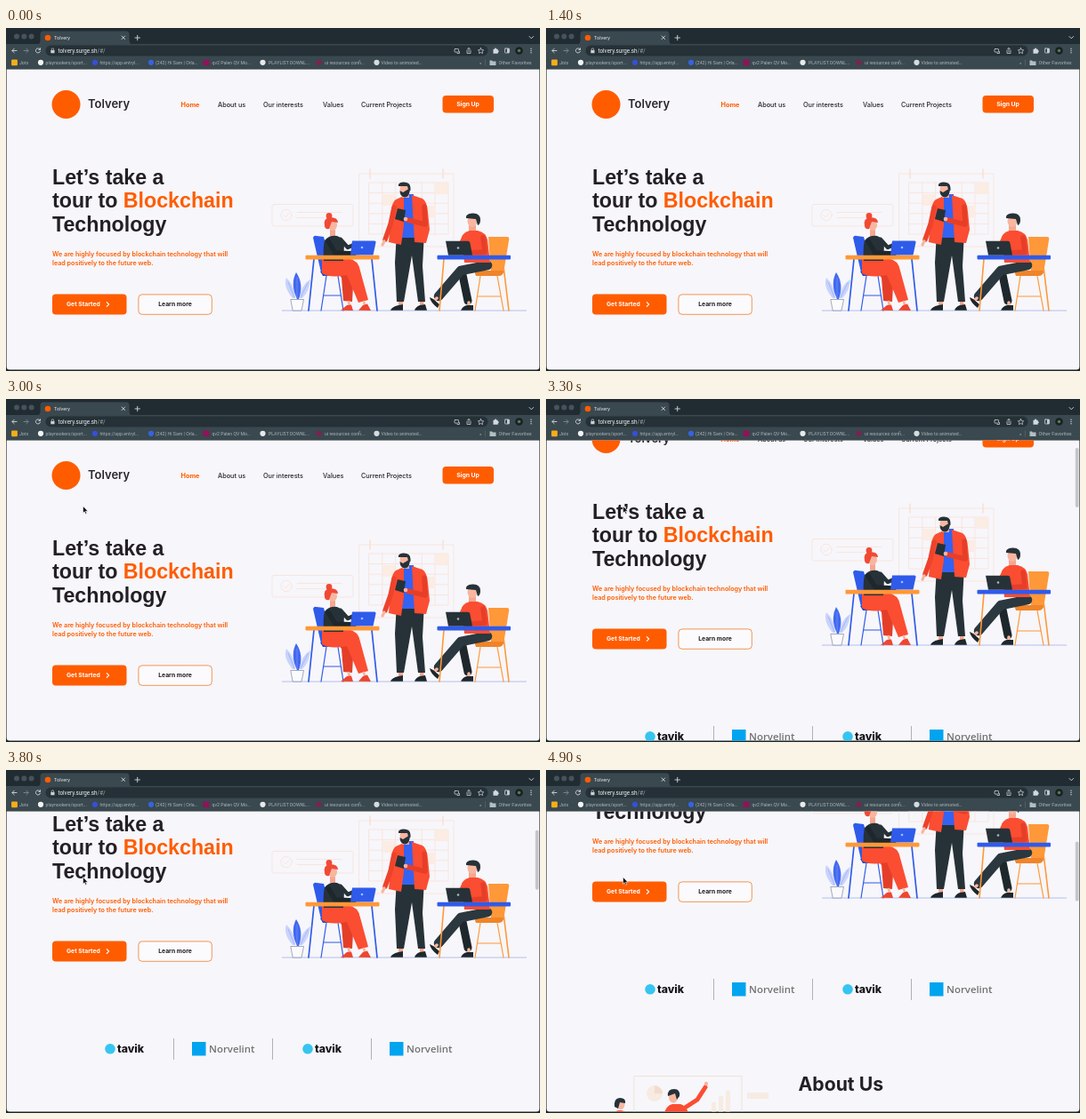
Recreate the animation shown at these times as an HTML page. Size 600 px wide and 386 px high, loop 5 s.

```html
<!DOCTYPE html>
<html lang="en">
<head>
<meta charset="utf-8">
<title>Tolvery</title>
<style>
html, body { margin: 0; width: 100%; height: 100%; overflow: hidden; background: #1b262b; }
svg { display: block; width: 100vw; height: 100vh; font-family: Inter, "Open Sans", sans-serif; }
.ui { font-family: Roboto, Inter, sans-serif; }
.nav { font-size: 7.3px; font-weight: 500; fill: #262329; }
.btn { font-size: 6.8px; font-weight: 700; }
.title { font: bold 23.2px "Liberation Sans", Arial, sans-serif; fill: #231f24; }
.lead { font-size: 7.2px; font-weight: 600; fill: #ff5c00; }
.line { fill: none; stroke-linecap: round; stroke-linejoin: round; }
</style>
</head>
<body>
<svg viewBox="0 0 600 386" preserveAspectRatio="none">
  <defs>
    <clipPath id="view"><path d="M.6 46.5H599.4V381Q599.4 384.5 596 384.5H4Q.6 384.5 .6 381Z"/></clipPath>
  </defs>
  <rect width="600" height="386" fill="#1b262b"/>

  <g clip-path="url(#view)">
    <rect y="46" width="600" height="340" fill="#f7f6fa"/>
    <g id="page">
      <!-- navigation -->
      <circle cx="67.5" cy="86" r="16" fill="#ff5c00"/>
      <text x="92" y="90" font-size="13" font-weight="600" fill="#2a272c">Tolvery</text>
      <g class="nav">
        <text x="196.5" y="88.5" style="font-weight:700;fill:#ff5c00">Home</text>
        <text x="238" y="88.5">About us</text>
        <text x="289" y="88.5">Our interests</text>
        <text x="356" y="88.5">Values</text>
        <text x="399" y="88.5">Current Projects</text>
      </g>
      <rect x="490.5" y="76" width="57.5" height="19.5" rx="4" fill="#ff5c00"/>
      <text class="btn" x="519" y="88.3" text-anchor="middle" fill="#fff">Sign Up</text>

      <!-- headline -->
      <g class="title">
        <text x="52" y="175.5">Let’s take a</text>
        <text x="52" y="202">tour to <tspan fill="#ff5c00">Blockchain</tspan></text>
        <text x="52" y="228.5">Technology</text>
      </g>
      <text class="lead" x="52" y="256.5">We are highly focused by blockchain technology that will</text>
      <text class="lead" x="52" y="266.5">lead positively to the future web.</text>
      <rect x="52" y="299.5" width="83.5" height="23" rx="4" fill="#ff5c00"/>
      <text class="btn" x="68" y="313.4" fill="#fff">Get Started</text>
      <path class="line" d="M113.2 308.6l2.4 2.4-2.4 2.4" stroke="#fff" stroke-width="1.1"/>
      <rect x="148.9" y="299.9" width="82.4" height="22.4" rx="4" fill="#fbfafc" stroke="#f08c45" stroke-width=".9"/>
      <text class="btn" x="190" y="313.4" text-anchor="middle" fill="#1f1c20">Learn more</text>

      <!-- pale wall pieces -->
      <g class="line" stroke="#f8e0d5" stroke-width=".7">
        <rect x="299" y="198.5" width="91" height="24.5" rx="2"/>
        <circle cx="315" cy="210.5" r="6.2"/>
        <path d="M312 210.5l2.2 2.3 4-4.5M327 207.5H377M327 213.5H364"/>
        <rect x="397" y="164" width="106" height="82"/>
        <path d="M409 159v10M491 159v10" stroke-width="1.4"/>
        <path id="grid"/>
      </g>
      <path d="M423 187h14v13h-14zM468 200h14v13h-14zM482 174h15v13h-15z" fill="#fbece4"/>

      <path d="M310 318H585" stroke="#a9b9ee" stroke-width=".9"/>

      <!-- plant -->
      <path d="M322 304Q311 291 315 281Q324 289 325 304ZM330 304Q332 288 342 283Q341 296 333 304Z" fill="#c9d4fb"/>
      <path d="M327 305Q319 288 326 275Q335 288 329 305Z" fill="#4169f0"/>
      <path class="line" d="M327 281V304M317 286L324 303M339 287L331 303" stroke="#8aa3f7" stroke-width=".6"/>
      <path d="M319.8 305.5H334.5L332 318H322.200Z" fill="#fbfbfd" stroke="#6b7596" stroke-width=".6"/>

      <!-- seated woman -->
      <path d="M345 236Q346 233 349 234L357 235Q363 256 365 275H354Z" fill="#2f5bea"/>
      <path d="M353 274H381Q382 279 377 279H356Z" fill="#2449c9"/>
      <path class="line" d="M360 279L354 318M373 279L379 318M357 301H376" stroke="#2f5bea" stroke-width="1.2"/>
      <path d="M362 262H384Q392 264 391 273L389 308L379 307L377 281Z" fill="#e53e28"/>
      <path d="M355 259H384Q396 261 398 273L407 306L396 309L383 278Q364 282 355 276Z" fill="#fb4d32"/>
      <path class="line" d="M385 308L386 313M402 308L404 314" stroke="#f8b6a0" stroke-width="2.6"/>
      <path d="M376 317.800L383 312L388 311.500L390 318ZM396 317.800L401 312L406 310.500L410 318Z" fill="#ef4630"/>
      <path d="M364 227h6v9h-6z" fill="#f5a78f"/>
      <path d="M358 239Q363 233 372 234Q379 236 380 244L379 262H357Q356 247 358 239Z" fill="#263238"/>
      <path class="line" d="M362 240L370 253L391 254" stroke="#1d272c" stroke-width="5.5"/>
      <path class="line" d="M376 238L384 247L393 243" stroke="#263238" stroke-width="4.5"/>
      <circle cx="396" cy="254" r="2" fill="#f8b6a0"/>
      <ellipse cx="367" cy="221.500" rx="5" ry="6.500" fill="#f8b6a0"/>
      <circle cx="363" cy="211.500" r="3.400" fill="#f04a35"/>
      <path d="M358 223Q356 214 364 213Q373 213 373 219L366 218L363 226Q359 227 358 223Z" fill="#f04a35"/>
      <path d="M389 239.500H414Q416 239.500 415.500 241.500L412.500 255.500H387Z" fill="#2f5bea"/>
      <circle cx="400" cy="247" r="1.300" fill="#a9bcfb"/>
      <path class="line" d="M346 260L340 318M411 260L417 318" stroke="#2f5bea" stroke-width="1.7"/>
      <rect x="336.500" y="255.700" width="83" height="4.800" rx="1" fill="#ff9838"/>

      <!-- standing man -->
      <path d="M439 230H470L468 268L471 308H463L456 256L447 308H439L437 264Z" fill="#263238"/>
      <path d="M441 308h5v5h-5zM465 308h4.500v5h-4.500z" fill="#f5a78f"/>
      <path d="M432 317.800Q433 314 441 312L446 311V317.800ZM459 317.800Q460 314 465 312L471 311L473 317.800Z" fill="#1d272c"/>
      <path d="M445 187H458L461 236H443Z" fill="#3462f2"/>
      <path d="M447 189L438 193Q434 196 433 204L430 241L444 244L447 222Z" fill="#fb4d32"/>
      <path d="M456 188L468 192Q473 195 474 207L476 227L472 242L459 241Z" fill="#fb4d32"/>
      <path class="line" d="M436 202L432 221L426 238" stroke="#ee422b" stroke-width="5.500"/>
      <path class="line" d="M470 201L471 221L451 216" stroke="#e73e28" stroke-width="5.500"/>
      <path class="line" d="M425 240L423 244" stroke="#f8b6a0" stroke-width="3.200"/>
      <path d="M440 203L449 205L447 218L437 215Z" fill="#263238"/>
      <circle cx="449" cy="215" r="2.300" fill="#f8b6a0"/>
      <path d="M445 185h8v6h-8z" fill="#f5a78f"/>
      <ellipse cx="448" cy="181" rx="5.400" ry="7" fill="#f8b6a0"/>
      <path d="M442.500 183L446 185L451 182L454 180Q454 190 448 190.500Q442.500 190 442.500 183Z" fill="#263238"/>
      <path d="M441 178Q440 174 446 173.500Q454.500 173 454.500 180V183L452 182L451 178Z" fill="#263238"/>

      <!-- seated man -->
      <path d="M542 235H563Q566 235 565 239L559 276H545Z" fill="#ff9838"/>
      <path d="M526 273H559Q559 279 553 279H528Z" fill="#ef842a"/>
      <path class="line" d="M533 279L527 318M552 279L559 318M530 302H556" stroke="#ff9838" stroke-width="1.200"/>
      <path class="line" d="M540 267L512 273L519 307" stroke="#1d272c" stroke-width="9"/>
      <path class="line" d="M541 267L511 273L486 302" stroke="#2b383f" stroke-width="10.500"/>
      <path class="line" d="M484 304L481 307M520 309V313" stroke="#f8b6a0" stroke-width="3.500"/>
      <path d="M476 303L480 305L487 311L485 315Q477 309 476 303ZM511 317.800Q513 313 518 312H525V317.800H511Z" fill="#1d272c"/>
      <path d="M520 221h8v9h-8z" fill="#f5a78f"/>
      <path d="M512 235Q514 230 521 228H530Q539 230 541 238L544 264H515Z" fill="#fb4d32"/>
      <path class="line" d="M536 236L538 252L517 253" stroke="#e73e28" stroke-width="5.500"/>
      <path class="line" d="M515 236L510 247" stroke="#fb4d32" stroke-width="6"/>
      <circle cx="514" cy="253" r="2.300" fill="#f8b6a0"/>
      <ellipse cx="524" cy="217" rx="5.500" ry="7" fill="#f8b6a0"/>
      <path d="M517 214Q516 209 524 208.500Q533 208 533 216Q533 221 530 222L528 215Z" fill="#263238"/>
      <path d="M494 239.700H519Q521 239.700 521.300 241.500L524 255.700H497Z" fill="#263238"/>
      <circle cx="508" cy="247.500" r="1.300" fill="#aeb8bd"/>
      <path class="line" d="M492 260L487 318M558 260L565 318" stroke="#ff9838" stroke-width="1.600"/>
      <rect x="484.500" y="255.700" width="82.500" height="4.800" rx="1" fill="#2f5bea"/>

      <!-- partner strip -->
      <path d="M188.500 409v24M299.500 409v24M410.500 409v24" stroke="#aaa8ae" stroke-width=".9"/>
      <g id="partners">
        <circle cx="117" cy="420.800" r="5.800" fill="#36c5f0"/>
        <text x="125" y="424.800" font-size="12.300" font-weight="800" fill="#17151a">tavik</text>
        <rect x="209" y="413" width="15.500" height="15.500" fill="#00a4ef"/>
        <text x="228" y="425.200" style="font:600 11.400px 'Open Sans',sans-serif" fill="#737373">Norvelint</text>
      </g>
      <use href="#partners" x="222"/>

      <!-- next section -->
      <text x="283.500" y="534.500" font-size="21.200" font-weight="700" fill="#231f24">About Us</text>
      <path class="line" d="M99 570V518.500H220V570" stroke="#eadfc9" stroke-width=".7"/>
      <g fill="#f7ebe2">
        <circle cx="122" cy="538" r="9"/>
        <path d="M186 548h5v12h-5zM194 541h5v19h-5zM202 535h5v25h-5zM226 537h24v7h-24z"/>
      </g>
      <path d="M122 538V529A9 9 0 0 1 131 538Z" fill="#f3dccd"/>
      <path class="line" d="M153 556L170 545L179 531" stroke="#fb4d32" stroke-width="5"/>
      <circle cx="180" cy="527" r="2.200" fill="#f8b6a0"/>
      <path d="M132 570Q132 552 142 550H151Q160 552 162 570Z" fill="#fb4d32"/>
      <ellipse cx="143" cy="542" rx="5" ry="6.600" fill="#f8b6a0"/>
      <path d="M137 541Q136 533 144 533Q151 533 150 541L147 545L145 538Z" fill="#263238"/>
      <ellipse cx="84" cy="550" rx="4.600" ry="6" fill="#f8b6a0"/>
      <path d="M77 553Q76 543 83 543Q90 543 89 549L83 548L81 555Z" fill="#263238"/>
      <path d="M75 562Q77 557 83 557Q89 557 91 562Z" fill="#fb4d32"/>
    </g>
    <rect id="thumb" x="594.800" width="3.700" height="67" rx="1.850" fill="#c6c5c9"/>
  </g>

  <!-- browser frame -->
  <g class="ui">
    <rect width="600" height="18.500" fill="#202c32"/>
    <rect y="18" width="600" height="28" fill="#3a484f"/>
    <path d="M35 18.500Q38.500 18 38.500 14V7Q38.500 3.500 42 3.500H135Q138.500 3.500 138.500 7V14Q138.500 18 142 18.500Z" fill="#3a484f"/>
    <g fill="#46535a"><circle cx="12" cy="9.500" r="3"/><circle cx="20.300" cy="9.500" r="3"/><circle cx="28.600" cy="9.500" r="3"/></g>
    <circle cx="47" cy="11" r="3.300" fill="#ff5c00"/>
    <text x="54" y="13" font-size="5.600" fill="#e4e9eb">Tolvery</text>
    <g class="line" stroke="#d3dadd" stroke-width=".9">
      <path d="M130 9l3.600 3.600M133.600 9l-3.600 3.600M145 11h5.400M147.700 8.300v5.400M588 9.500l2.300 2.300 2.300-2.300"/>
      <path d="M12 25.500H7M9.200 23.200L6.900 25.500l2.300 2.300M38.200 24a2.600 2.600 0 1 0 .3 2.200M38.500 22.700v1.700h-1.700"/>
      <path d="M20 25.500h5M22.800 23.200l2.300 2.300-2.300 2.300" stroke="#7d898f"/>
    </g>
    <rect x="44.500" y="19.600" width="497" height="11.800" rx="5.900" fill="#253137"/>
    <path d="M50.300 25h4.200v3.300h-4.200z" fill="#c9d1d4"/>
    <path class="line" d="M51.200 25v-1a1.200 1.200 0 0 1 2.400 0v1" stroke="#c9d1d4" stroke-width=".7"/>
    <text x="58.500" y="27.600" font-size="6.300" fill="#eef1f2">tolvery.surge.sh<tspan fill="#a2adb2">/#/</tspan></text>
    <g class="line" stroke="#c3ccd0" stroke-width=".8">
      <rect x="504" y="23.500" width="4.500" height="3.600" rx=".6"/><path d="M507 28.500h2.500v-2"/>
      <path d="M518 25v3.500h4V25M520 27v-4.500M518.700 23.700l1.300-1.300 1.300 1.300"/>
      <path d="M533.500 22.500l1 2.100 2.200.3-1.600 1.500.4 2.200-2-1.100-2 1.100.4-2.200-1.600-1.500 2.200-.3z"/>
      <rect x="560.500" y="23" width="5" height="5" rx=".7"/>
    </g>
    <path d="M563 23h2.500v5H563z" fill="#c3ccd0"/>
    <path d="M547.500 23.700h1.500a1.100 1.100 0 0 1 2.200 0h1.500v1.500a1.100 1.100 0 0 1 0 2.200v1.300h-5.200z" fill="#d3dadd"/>
    <circle cx="576.500" cy="25.500" r="4.300" fill="#182126"/><circle cx="576.500" cy="25.500" r="1.800" fill="#5e7a4a"/>
    <g fill="#d3dadd"><circle cx="590" cy="23.200" r=".7"/><circle cx="590" cy="25.500" r=".7"/><circle cx="590" cy="27.800" r=".7"/></g>
    <g id="marks" font-size="5.200" fill="#a9b5ba"></g>
    <path d="M538.500 35.500v7" stroke="#5b686e" stroke-width=".7"/>
    <path d="M543.500 36.500h2.500l.8 1h3.700v4.500h-7z" fill="#b3bec3"/>
  </g>
  <path id="cursor" d="M86.500 120.500V128.300L88.300 126.700L89.500 129.400L90.800 128.800L89.600 126.200H92Z" fill="#0c0c0d" stroke="#fff" stroke-width=".6"/>
</svg>
<script>
const $ = id => document.getElementById(id);
const SVG = "http://www.w3.org/2000/svg";
const LOOP = 5000, STEP = 100;

function add(parent, tag, attrs, label) {
  const el = document.createElementNS(SVG, tag);
  for (const key in attrs) el.setAttribute(key, attrs[key]);
  if (label) el.textContent = label;
  parent.append(el);
}

// calendar cells
let grid = "M408 174H497V232H408Z";
for (let i = 1; i < 6; i++) grid += `M${408 + i * 14.8} 174V232`;
for (let i = 1; i < 5; i++) grid += `M408 ${174 + i * 11.6}H497`;
$("grid").setAttribute("d", grid);

// bookmark bar: icon x, text x, icon colour, label, square icon
const bookmarks = [
  [9.5, 15, "#f5ae1b", "Jots", true],
  [39, 44.5, "#f1f3f4", "playnookers/sport..."],
  [100, 105.5, "#3450d8", "https://app.entryl..."],
  [163, 168, "#3563e0", "(242) Hi Sam | Orla..."],
  [225, 231.5, "#8d1458", "qv2 Palen QV Mo...", true],
  [288.5, 295, "#e6eaec", "PLAYLIST DOWNL..."],
  [351.5, 358, "#7a2352", "ui resources confi..."],
  [416.5, 421.5, "#d5dcdf", "Video to animated..."]
];
const marks = $("marks");
for (const [cx, x, fill, label, square] of bookmarks) {
  if (square) add(marks, "rect", { x: cx - 3.4, y: 35.4, width: 6.8, height: 6.8, rx: 1, fill });
  else add(marks, "circle", { cx, cy: 38.8, r: 3.1, fill });
  add(marks, "text", { x, y: 40.5 }, label);
}
add(marks, "text", { x: 532, y: 40.5 }, "»");
add(marks, "text", { x: 553.5, y: 40.5, "font-size": 5.5 }, "Other Favorites");

// two swipes, the first slowing down: time, offset
const swipes = [[3000, 0], [3100, 8], [3300, 41], [3500, 78], [3800, 107],
                [4100, 117], [4600, 122], [4700, 134], [4900, 174]];

function scrollAt(t) {
  if (t <= swipes[0][0]) return 0;
  const i = swipes.findIndex(p => p[0] >= t);
  if (i < 0) return swipes.at(-1)[1];
  const [t0, a] = swipes[i - 1], [t1, b] = swipes[i];
  return a + (b - a) * (t - t0) / (t1 - t0);
}

function draw(time) {
  const t = Math.floor(time % LOOP / STEP) * STEP;
  const y = scrollAt(t);
  $("page").setAttribute("transform", `translate(0 ${-y})`);
  $("thumb").setAttribute("y", 47 + y * 0.193);
  $("thumb").setAttribute("visibility", y > 0 ? "visible" : "hidden");
  $("cursor").setAttribute("visibility", t >= 1900 ? "visible" : "hidden");
}

const start = performance.now();
function tick() {
  draw(performance.now() - start);
  requestAnimationFrame(tick);
}
tick();
</script>
</body>
</html>
```
